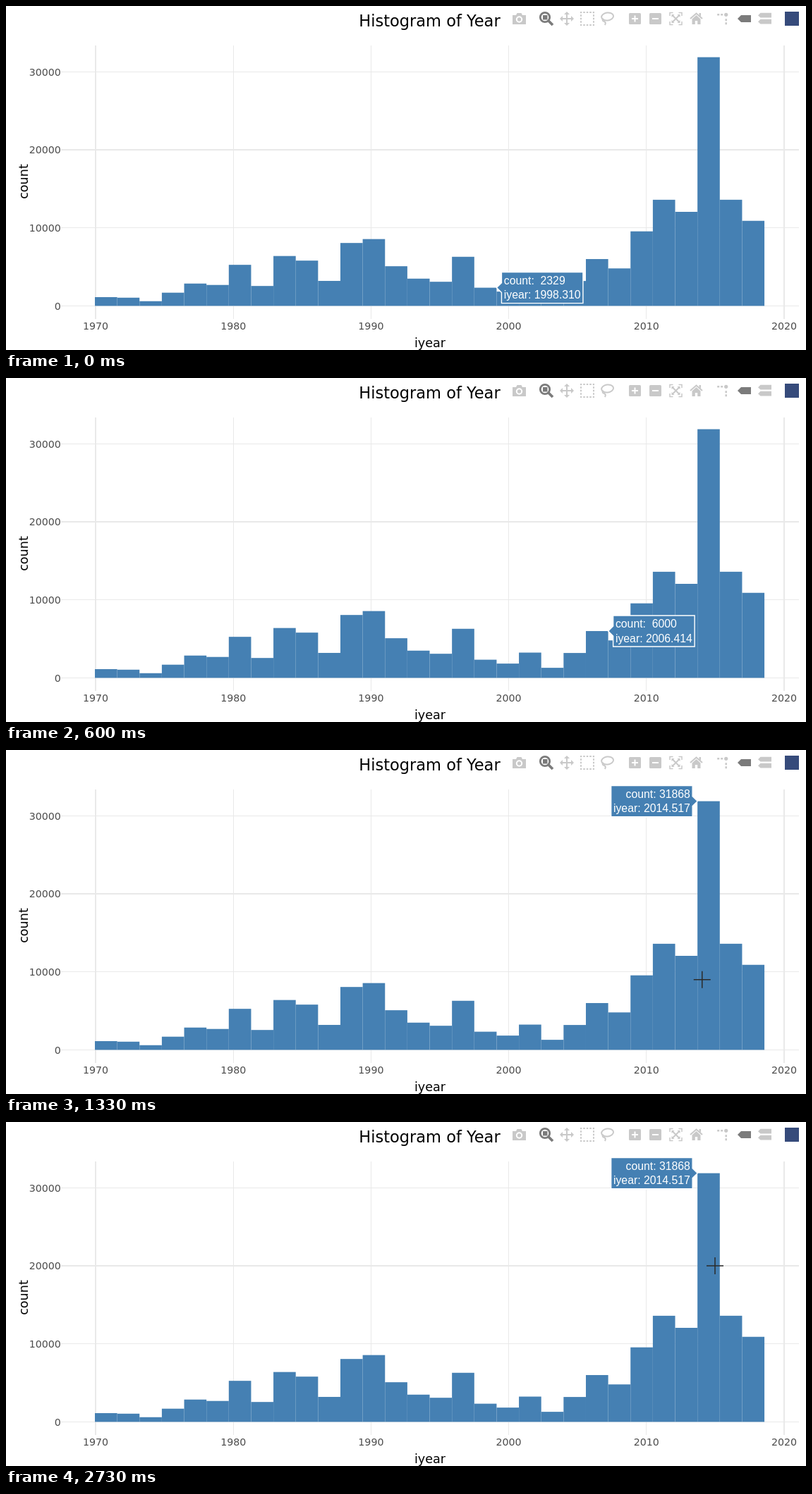
Recreate the animation shown at these times as an HTML page. Size 1134 by 488 pixels, loop 2800 ms.

```html
<!DOCTYPE html>
<html lang="en">
<head>
<meta charset="utf-8">
<title>Histogram of Year</title>
<style>
  html, body { margin: 0; width: 100%; height: 100%; overflow: hidden; background: #fff; }
  svg { display: block; }
  text { font-family: "DejaVu Sans", sans-serif; }
  .tick { font-size: 14.2px; fill: #4d4d4d; }
  .axis { font-size: 17.6px; text-anchor: middle; }
  #label text { font: 15.8px "Liberation Sans", Arial, sans-serif; fill: #fff; white-space: pre; }
  .icons { fill: #c9c9c9; stroke: #c9c9c9; stroke-width: 0; }
  .icons .active { fill: #7b7b7b; stroke: #7b7b7b; }
  .icons .line { fill: none; stroke-width: 2; }
  .icons .cut { fill: none; stroke: #fff; stroke-width: 2; }
</style>
</head>
<body>
<svg width="1134" height="488" viewBox="0 0 1134 488">
  <g id="grid" stroke="#e9e9e9"></g>
  <g id="bars" fill="#4580b3"></g>
  <g id="ticks" class="tick"></g>
  <text x="600.5" y="29" font-size="22.5" text-anchor="middle">Histogram of Year</text>
  <text class="axis" x="601" y="483.5">iyear</text>
  <text class="axis" transform="translate(30.5 249) rotate(-90)">count</text>

  <!-- Toolbar: each icon is drawn around its own centre. -->
  <g class="icons" transform="translate(0 18)">
    <g transform="translate(727.5)">
      <path d="M-9.5-5h5l1.5-3h6l1.5 3h5V8h-19z"/>
      <circle class="cut" cy="1" r="3.7"/>
    </g>
    <g transform="translate(766)" class="active">
      <circle class="line" cx="-2" cy="-2" r="6.7" style="stroke-width: 2.8"/>
      <path class="line" d="M3 3L9 9" style="stroke-width: 3.8"/>
      <rect x="-5" y="-5" width="6.5" height="6.5"/>
    </g>
    <g transform="translate(795)">
      <path class="quarter" d="M-1 0v-6h-3l4-4 4 4h-3v6z"/>
    </g>
    <g transform="translate(824)">
      <path class="line" d="M-9-9h18v18h-18z" stroke-dasharray="2.5 2" stroke-dashoffset="1.25"/>
    </g>
    <g transform="translate(853)">
      <ellipse class="line" cy="-3" rx="8.5" ry="5.5" transform="rotate(-8)"/>
      <path class="line" d="M-6 0q-3 3 1 4q3 1 1 5"/>
    </g>
    <g transform="translate(891.5)">
      <rect x="-8.5" y="-8" width="17" height="16" rx="1.5"/>
      <path class="cut" d="M-4.5 0h9M0-4.5v9"/>
    </g>
    <g transform="translate(920.5)">
      <rect x="-8.5" y="-8" width="17" height="16" rx="1.5"/>
      <path class="cut" d="M-4.5 0h9"/>
    </g>
    <g transform="translate(949.5)">
      <g class="quarter">
        <path class="line" d="M-8.5-4v-4.5h4.5" style="stroke-width: 1.5"/>
        <path class="line" d="M0 0l-5-5"/>
        <path d="M-6-6h4l-4 4z"/>
      </g>
    </g>
    <g transform="translate(978.5)">
      <path class="line" d="M-8.5 0L0-7.5L8.5 0"/>
      <path d="M0-5L6 .5V8H1.7V3h-3.4v5H-6V.5zM4-8h2.5v5L4-5z"/>
    </g>
    <g transform="translate(1020.7)">
      <circle cy="-5.7" r="2.6"/>
      <path class="line" d="M-12.5-5.7h9M0 .3v8" stroke-dasharray="3 2" style="stroke-width: 2.5"/>
    </g>
    <path class="active" d="M1037 0l5-5h14v10h-14z"/>
    <path d="M1066-4.8l3.5-3.4h15.500v6.800h-15.500zm0 9l3.500-3.400h15.500v6.800h-15.500z"/>
    <rect x="1104" y="-10" width="20" height="20" fill="#364b7b"/>
  </g>

  <g id="label">
    <path fill="#4580b3" stroke="#fff" stroke-width="1.4"/>
    <text y="-4.8"></text>
    <text y="15.8"></text>
  </g>
  <path id="cursor" d="M-12 0H12M0-12V12" stroke="#2b2b2b" stroke-width="1.5"/>
</svg>
<script>
const LOOP = 2800, FPS = 15, STAGE_W = 1134;
const BIN = 47 / 29; // bin width in years

// Chart data: items per bin.
const counts = [
  1120, 1050, 600, 1690, 2860, 2680, 5260, 2550, 6390, 5800,
  3200, 8060, 8560, 5080, 3490, 3090, 6290, 2329, 1830, 3239,
  1290, 3190, 6000, 4800, 9550, 13598, 12050, 31868, 13600, 10900
];

const $ = id => document.getElementById(id);
const xOf = year => 127 + (year - 1970) * 19.52;
const yOf = count => 425.4 - count * 0.01107;
const binYear = i => 1970 + 22 / 29 + i * BIN;
const binLeft = i => xOf(binYear(i) - BIN / 2);

function add(parent, tag, attrs, text = "") {
  const node = document.createElementNS(parent.namespaceURI, tag);
  for (const key in attrs) node.setAttribute(key, attrs[key]);
  node.textContent = text;
  parent.append(node);
}

// Lines snap to whole pixels; one lying between two pixels covers both.
function gridLine(pos, path) {
  const between = Math.abs(pos - Math.round(pos)) < 0.1;
  const snapped = between ? Math.round(pos) : Math.floor(pos) + 0.5;
  add($("grid"), "path", { d: path(snapped), "stroke-width": between ? 2 : 1 });
}

for (let year = 1970; year <= 2020; year += 10) {
  const x = xOf(year);
  gridLine(x, p => `M${p} 56V444`);
  add($("ticks"), "text", { x, y: 459.3, "text-anchor": "middle" }, year);
}
for (let count = 0; count <= 30000; count += 10000) {
  const y = yOf(count);
  gridLine(y, p => `M78 ${p}H1124`);
  add($("ticks"), "text", { x: 77.8, y: y + 5.3, "text-anchor": "end" }, count);
}
counts.forEach((count, i) => add($("bars"), "rect", {
  x: binLeft(i), y: yOf(count), width: binLeft(1) - binLeft(0), height: yOf(0) - yOf(count)
}));

// Complete icons with four-fold symmetry.
for (const part of document.querySelectorAll(".quarter")) {
  for (const angle of [90, 180, 270]) {
    const copy = part.cloneNode(true);
    copy.setAttribute("transform", `rotate(${angle})`);
    part.after(copy);
  }
}

const [box, countText, yearText] = $("label").children;

function showLabel(bar) {
  const flip = binLeft(bar + 1) + 122.5 > STAGE_W;
  const side = flip ? -1 : 1;
  const tip = binLeft(flip ? bar : bar + 1);
  $("label").setAttribute("transform", `translate(${tip} ${yOf(counts[bar])})`);
  box.setAttribute("d", `M0 0L${7 * side} 7V22H${122.5 * side}V-22H${7 * side}V-7Z`);
  countText.textContent = "count: " + String(counts[bar]).padStart(5, "\u00a0");
  yearText.textContent = "iyear: " + binYear(bar).toFixed(3);
  for (const text of [countText, yearText]) {
    text.setAttribute("x", 10.3 * side);
    text.setAttribute("text-anchor", flip ? "end" : "start");
  }
}

// Progress from 0 to 1 between two steps, held outside them.
const progress = (step, from, to) => Math.min(1, Math.max(0, (step - from) / (to - from)));

function hoveredBar(step) {
  if (step < 5) return 17;
  if (step >= 19) return 27;
  return Math.floor(19 + 6 * progress(step, 5, 13));
}

function draw(time) {
  // Source steps of 1/15 s, rounded down to 10 ms.
  const step = Math.floor((time % LOOP + 7) * FPS / 1000);
  showLabel(hoveredBar(step));

  const rise = progress(step, 19, 23), climb = progress(step, 26, 30);
  const x = 986 + 3 * rise + 16 * climb;
  const y = 342 - 65 * rise - 73 * climb;
  $("cursor").style.display = step >= 19 ? "" : "none";
  $("cursor").setAttribute("transform", `translate(${x} ${y})`);
}

const started = performance.now();
function tick() {
  draw(performance.now() - started);
  requestAnimationFrame(tick);
}
tick();
</script>
</body>
</html>
```
